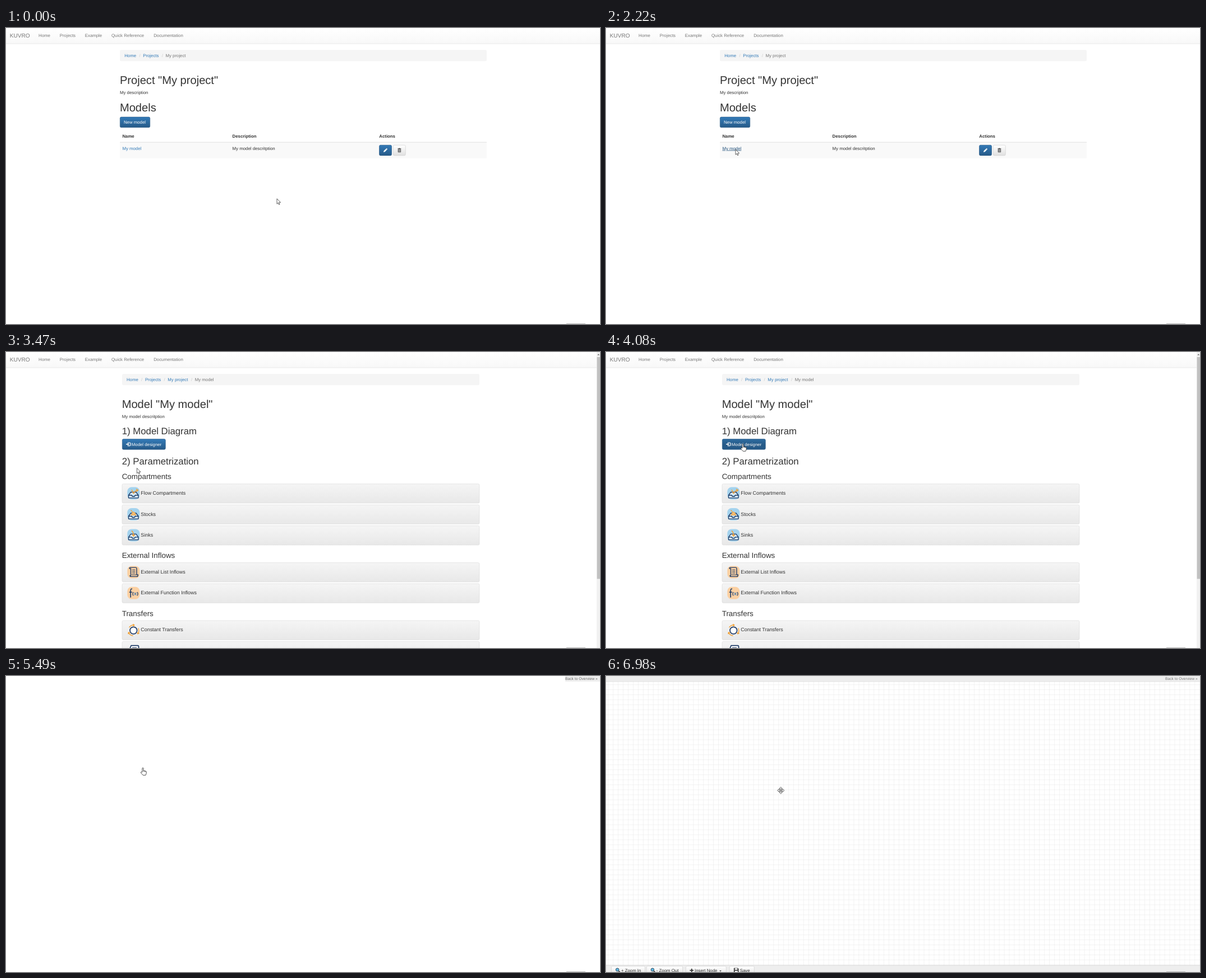
These frames come from a looping animation (1059 px wide and 529 px high, 7.89 s). An HTML page:

```html
<!DOCTYPE html>
<html lang="en">
<head>
<meta charset="utf-8">
<title>Model designer walkthrough</title>
<style>
  html, body { margin: 0; width: 100%; height: 100%; overflow: hidden; background: #fff; }
  svg { display: block; width: 1059px; height: 529px; }
  text { font-family: "Liberation Sans", Arial, Helvetica, sans-serif; text-rendering: geometricPrecision; white-space: pre; }
</style>
</head>
<body>
<svg id="stage" viewBox="0 0 1059 529"></svg>
<script>
const LOOP = 7890, K = 0.5588; // K: page zoom
const NAVY = '#1d3a66', ORANGE = '#f0a33c', LINK = '#337ab7', GREY = '#777', INK = '#333';
const $ = id => document.getElementById(id);

const text = (x, y, s, size = 14, fill = INK, extra = '') =>
  `<text x="${x}" y="${y}" font-size="${(size * K).toFixed(2)}" fill="${fill}" ${extra}>${s}</text>`;
const rect = (x, y, w, h, fill, extra = '') =>
  `<rect x="${x}" y="${y}" width="${w}" height="${h}" fill="${fill}" ${extra}/>`;
const path = (d, stroke = NAVY, width = 1.4, fill = 'none') =>
  `<path d="${d}" fill="${fill}" stroke="${stroke}" stroke-width="${width}" stroke-linejoin="round"/>`;
const at = (x, y, s) => `<g transform="translate(${x} ${y})">${s}</g>`;
const group = (id, s) => `<g id="${id}">${s}</g>`;
const button = (x, y, w, h, kind, id = '') =>
  rect(x + .3, y + .3, w - .6, h - .6, `url(#${kind})`,
    `id="${id}" rx="2.2" stroke="${kind === 'primary' ? '#245580' : '#ccc'}" stroke-width=".6"`);
const gradient = (id, a, b, end = 1) =>
  `<linearGradient id="${id}" x2="0" y2="1"><stop stop-color="${a}"/><stop offset="${end}" stop-color="${b}"/></linearGradient>`;

const defs = `<defs>
  ${gradient('bar', '#fff', '#f8f8f8')}
  ${gradient('primary', '#337ab7', '#265a88')}
  ${gradient('hover', '#2d6b9f', '#265a88', .56)}
  ${gradient('plain', '#fff', '#e0e0e0')}
  ${gradient('panel', '#f5f5f5', '#e8e8e8')}
  <pattern id="grid" x="3.3" y="15.1" width="8.94" height="8.94" patternUnits="userSpaceOnUse">
    <path d="M.3 0V8.94M0 .3H8.94" stroke="#e6e6e6" stroke-width=".6"/>
  </pattern>
</defs>`;

const navbar = width =>
  rect(0, 0, width, 28, 'url(#bar)') + rect(0, 27.6, width, .7, '#e2e2e2') + rect(0, 28.3, width, 1, '#f7f7f7') +
  text(6.8, 17, 'KUVRO', 18, GREY) +
  [[58, 'Home'], [95.8, 'Projects'], [140.8, 'Example'], [188, 'Quick Reference'], [263.2, 'Documentation']]
    .map(([x, s]) => text(x, 16.4, s, 14, GREY)).join('');

const crumbs = (x, w, items, slashes) =>
  rect(x, 39.2, w, 20, '#f5f5f5', 'rx="2.2"') +
  items.map(([tx, s], i) => text(tx, 52.1, s, 14, i === items.length - 1 ? GREY : LINK)).join('') +
  slashes.map(sx => text(sx, 52.1, '/', 14, '#ccc')).join('');

const pencil = path('M-3.6 3.6l.8-2.6L2-3.7 3.7-2-1 2.8Z', 'none', 0, '#fff') + path('M.9-2.6L2.6-.9', '#2c699d', .6);
const trash = path('M-3-2.6H3M-1.2-3H1.2', INK, 1.1) + path('M-2.3-1.3H2.3V3.5H-2.3ZM-.8-.6V3M.8-.6V3', INK, .8);
const signIn = path('M-1.2-2.8H2.6Q3.8-2.8 3.8-1.6V1.6Q3.8 2.8 2.6 2.8H-1.2', '#fff', 1.2) +
  path('M-4-.8H-1.2V-2.5L1.7 0-1.2 2.5V.8H-4Z', 'none', 0, '#fff');

const projectPage =
  navbar(1059) +
  crumbs(203, 654, [[211.2, 'Home'], [244.2, 'Projects'], [284.5, 'My project']], [237.5, 277.8]) +
  text(202.9, 99.6, 'Project "My project"', 36) +
  text(203, 117.5, 'My description') +
  text(202.9, 149.4, 'Models', 36) +
  button(203, 158.8, 54, 19.2, 'primary') + text(209.9, 171.3, 'New model', 14, '#fff') +
  [[207.4, 'Name'], [403.6, 'Description'], [665.3, 'Actions']]
    .map(([x, s]) => text(x, 196.4, s, 14, INK, 'font-weight="bold"')).join('') +
  rect(203, 203.7, 654, 1.1, '#ddd') + rect(203, 204.8, 654, 28, '#f9f9f9') +
  text(207.4, 217.6, 'My model', 14, LINK, 'id="link"') +
  text(403.6, 217.6, 'My model descritption') +
  button(665.2, 209, 22.6, 19.2, 'primary') + at(676.5, 218.5, pencil) +
  button(690, 209, 22.6, 19.2, 'plain') + at(701.4, 218.3, trash);

// Icons live in a 23 px box.
const badge = fill => rect(.3, .5, 22, 22, fill, 'rx="7.5"');
const tray = path('M2.5 19.8V15L6.5 9.5H16L20 15V19.8Z', NAVY, 1.3, '#d4e9f5') +
  path('M2.5 15H8Q8.5 17.3 11.2 17.3T14.4 15H20', NAVY, 1.3, '#a4d3ee');
const flow = badge('#a4d3ee') + tray + path('M8 5L11.5 12Q13 7 18.5 6.2M16 3.8L19.5 6 16.5 8.5', ORANGE, 1.5);
const stock = badge('#a4d3ee') + tray + path('M7 13L9 9 11.2 7.2 14 9 15.5 13Z', ORANGE, 1, '#f3bd78') + path('M6.5 4L10 8', ORANGE, 1.2);
const sink = badge('#a4d3ee') + tray + path('M8 3.5Q11.5 6 11.4 13M9 10.7L11.4 13.4 13.8 10.7', ORANGE, 1.5);
const scroll = badge('#fbd0a2') +
  path('M6.5 18V5.2H4.2Q3.8 3.2 5.5 3.2H15.5Q17 3.2 17 5V16H19.3Q19.3 19.5 17 19.5H7Q5 19.5 5 17', NAVY, 1.4) +
  path('M9 7.5H14.5M9 10.3H14.5M9 13.1H14.5M8 16.3H17', NAVY, 1);
const func = badge('#fbd0a2') +
  path('M9 4.2Q6.2 3.2 6.2 7V19.5M3.7 10H8.8', NAVY, 1.6) +
  path('M11 9.8Q8.8 13 11 16.2M18 9.8Q20.2 13 18 16.2', NAVY, 1.2) + path('M12.6 10.7L16.4 15.3M16.4 10.7L12.6 15.3', '#5d87ad', 1.3);
const cycle = `<circle cx="11.3" cy="12.3" r="6.3" fill="#fff" stroke="${NAVY}" stroke-width="1.7"/>` +
  [0, 120, 240].map(a => `<g transform="rotate(${a} 11.3 12.3)">` +
    path('M3.5 7A9.6 9.6 0 0 1 12.5 2.7M10.3.9L12.9 2.8 10.7 5', ORANGE, 1.4) + '</g>').join('');
const tag = path('M3 12L7 2H19Q20.5 2 20.5 4V12', NAVY, 1.7, '#fff') + path('M9 6H17', NAVY, 1.2);

const panel = (y, icon, label) =>
  rect(207, y, 637, 34.4, 'url(#panel)', 'rx="2.2" stroke="#d8d8d8" stroke-width=".6"') +
  at(216, y + 5.3, icon) + text(240.3, y + 19.3, label, 16);

const modelPage =
  navbar(1053) +
  crumbs(207, 637, [[214.9, 'Home'], [247.9, 'Projects'], [288.3, 'My project'], [336.7, 'My model']], [241.1, 281.5, 330]) +
  text(206.7, 99.6, 'Model "My model"', 36) +
  text(206.8, 117.5, 'My model descritption') +
  text(206.8, 146.6, '1) Model Diagram', 30) +
  button(207, 155.3, 77.6, 19.2, 'primary', 'designer') + at(218, 164.8, signIn) +
  text(223.8, 167.8, 'Model designer', 14, '#fff') +
  text(206.8, 200.9, '2) Parametrization', 30) +
  text(206.7, 227.1, 'Compartments', 24) +
  panel(235.7, flow, 'Flow Compartments') + panel(273.2, stock, 'Stocks') + panel(310.6, sink, 'Sinks') +
  text(206.7, 368.1, 'External Inflows', 24) +
  panel(376.6, scroll, 'External List Inflows') + panel(414, func, 'External Function Inflows') +
  text(206.7, 471.6, 'Transfers', 24) +
  panel(480, cycle, 'Constant Transfers') + panel(517.4, tag, '') +
  rect(1053, 0, 6, 529, '#f1f1f1') + rect(1053.6, 9, 5.4, 396.5, '#c1c1c1') +
  path('M1054.4 5.4L1056.3 3.4 1058.2 5.4Z', 'none', 0, '#555');

const backLink = fill => text(997, 7.4, 'Back to Overview »', 12, fill);
const blankPage = rect(997, 0, 62, 10, '#eee') + backLink('#666');

const lens = path('M4.8 4.8L8.3 8.3', '#444', 1.8) +
  '<circle cx="3.3" cy="3.3" r="2.8" fill="#5cb6e0" stroke="#456" stroke-width="1"/>';
const floppy = path('M.5.5H7L8.3 1.8V8.5H.5Z', INK, .8, '#444') + rect(2, .6, 4.5, 3, '#eee') + rect(2, 5.3, 5, 3, '#fff');

const editorPage =
  rect(0, 0, 1059, 529, 'url(#grid)') +
  rect(0, 0, 1059, 9.5, '#eee') + rect(0, 9.5, 1059, .8, '#d8d8d8') + backLink('#777') +
  rect(0, 517, 1059, 12, '#eee') + rect(0, 516.6, 1059, .8, '#d4d4d4') +
  [[9.3, 60.6], [72, 65], [142, 72.6], [219.8, 44.8]].map(([x, w]) => button(x, 518.3, w, 19, 'plain')).join('') +
  at(17, 521.6, lens) + text(27, 528.9, '+ Zoom In') +
  at(79.6, 521.6, lens) + text(89.8, 528.9, '- Zoom Out') +
  path('M149.5 526.2H156M152.75 523V529.4', INK, 1.7) + text(158, 528.9, 'Insert Node') +
  path('M202.3 526.2H205.8L204 528.2Z', 'none', 0, INK) +
  at(227.8, 521.6, floppy) + text(238.8, 528.9, 'Save');

// Cursors are drawn with their hot spot at 0,0.
const cursors = {
  arrow: path('M0 0V9.4L2.1 7.4 3.5 10.7 5 10.1 3.6 6.9H6.6Z', '#222', .7, '#fff'),
  hand: path('M-1.1 8V1.2A1.1 1.1 0 0 1 1.1 1.2V5.2L5 6Q6.4 6.3 6.3 7.8L6 10.5 4.9 13.3H.3L-3.5 9Q-4 7.5-2.5 7.3Z', '#222', .8, '#fff') +
    path('M1.1 5.2V7.2M3 5.6V7.4M4.8 6V7.6', '#222', .6),
  ring: '<circle r="5.6" fill="none" stroke="#2f94d0" stroke-width="2.4"/>',
  move: path([0, 1, 2, 3].map(i => {
    const turn = (x, y) => [[x, y], [-y, x], [-x, -y], [y, -x]][i].join(' ');
    return (i ? 'L' : 'M') + [[-.9, -.9], [-.9, -3.2], [-2.6, -3.2], [0, -6.2], [2.6, -3.2], [.9, -3.2]].map(p => turn(...p)).join('L');
  }).join('') + 'Z', INK, .75, '#fff') + '<circle r=".8" fill="#333"/>'
};

const pages = { project: projectPage, model: modelPage, blank: blankPage, editor: editorPage };
$('stage').innerHTML = defs + rect(0, 0, 1059, 529, '#fff') +
  Object.entries(pages).map(([id, s]) => group(id, s)).join('') +
  rect(999, 528, 34, 1, '#b8b8b8') +
  group('pointer', Object.entries(cursors).map(([id, s]) => group(id, s)).join(''));

// Pointer runs: [start, end, steps, to x, to y]
const runs = [
  [510, 1290, 11, 251, 223], [1360, 1440, 2, 231, 218], [1590, 1590, 1, 231, 217],
  [3250, 4000, 11, 244, 165], [4080, 4080, 1, 244, 164],
  [6100, 6100, 1, 249, 167.3], [6250, 6980, 11, 311.7, 204.5]
];
const ease = p => p * p * (3 - 2 * p);

function pointerAt(t) {
  let x = 483, y = 305;
  for (const [start, end, steps, toX, toY] of runs) {
    if (t < start) break;
    const gap = (end - start) / (steps - 1) || 1;
    const p = ease(Math.min(steps, Math.floor((t - start) / gap + 1e-6) + 1) / steps);
    x += (toX - x) * p;
    y += (toY - y) * p;
  }
  return [x, y];
}

function cursorAt(t, y) {
  if (t < 1360) return 'arrow';
  if (t < 2140) return 'hand';
  if (t < 2220) return 'ring';
  if (t < 2610) return 'arrow';
  if (t < 3250) return 'hand';
  if (t < 4780) return y < 174.5 ? 'hand' : 'arrow';
  if (t < 4860) return 'ring';
  if (t < 5490) return 'arrow';
  return t < 6100 ? 'hand' : 'move';
}

const showOnly = (set, name) => {
  for (const id in set) $(id).style.display = id === name ? '' : 'none';
};

function draw(now) {
  const t = now % LOOP;
  const [x, y] = pointerAt(t);
  showOnly(pages, t < 2610 ? 'project' : t < 5490 ? 'model' : t < 5560 ? 'blank' : 'editor');
  showOnly(cursors, cursorAt(t, y));
  $('pointer').setAttribute('transform', `translate(${x.toFixed(1)} ${y.toFixed(1)})`);
  const overLink = t >= 1360;
  $('link').setAttribute('fill', overLink ? '#23527c' : LINK);
  $('link').setAttribute('text-decoration', overLink ? 'underline' : 'none');
  $('designer').setAttribute('fill', y < 174.5 ? 'url(#hover)' : 'url(#primary)');
}

let begin;
function tick(now) {
  begin ??= now;
  draw(now - begin);
  requestAnimationFrame(tick);
}
draw(0);
requestAnimationFrame(tick);
</script>
</body>
</html>
```
